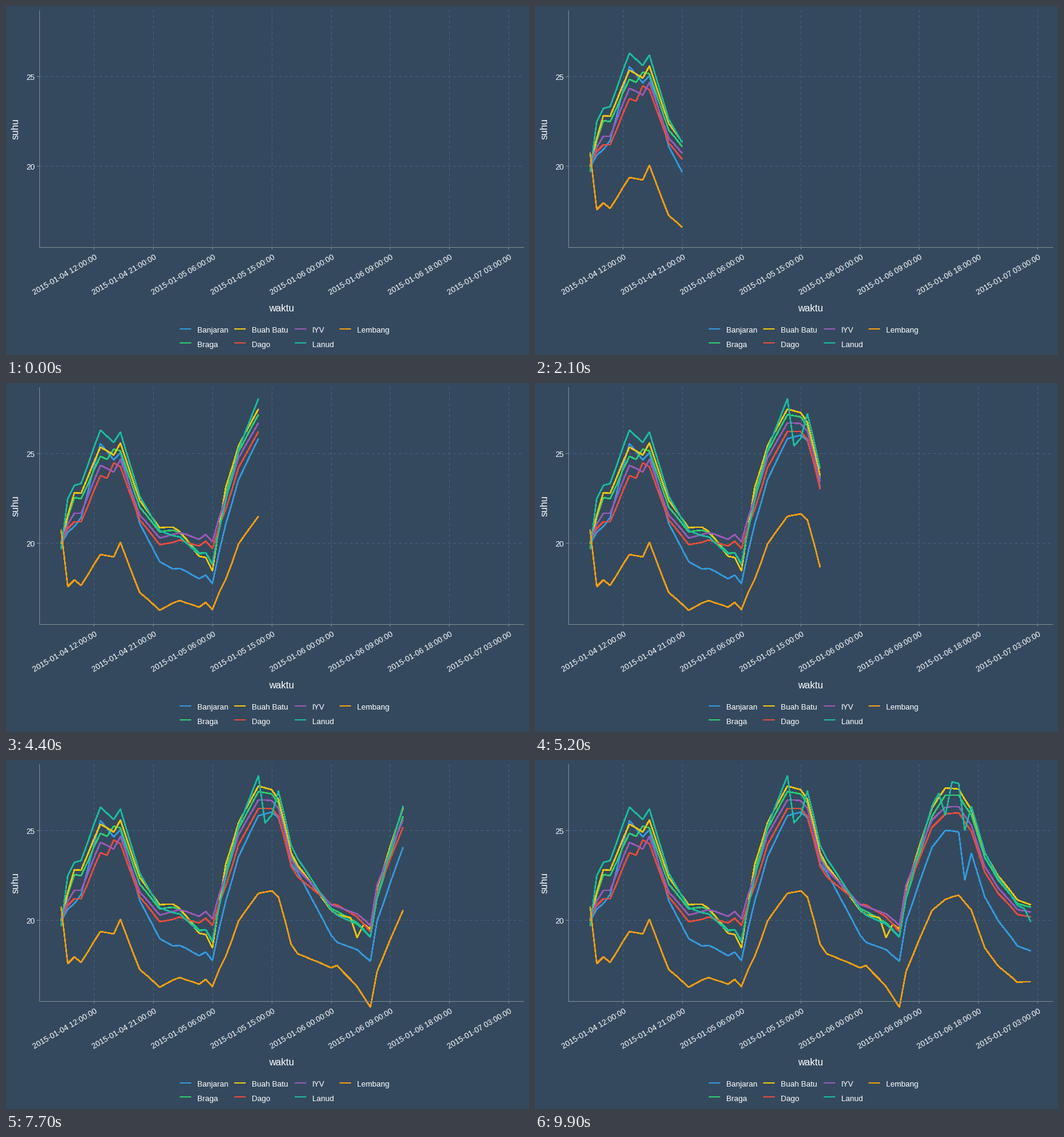
Recreate the animation shown at these times as a matplotlib script. Size 864 by 576 pixels, loop 10 s.

```python
import numpy as np
import matplotlib.pyplot as plt
from matplotlib.animation import FuncAnimation

W, H, DPI = 864, 576, 96
PX = 72 / DPI                      # one pixel in points
FRAMES, HOURS = 100, 67
BG, GRID, AXIS, INK = "#34495e", "#46627f", "#7f8c8d", "#ffffff"
LEFT, RIGHT, TOP, BOTTOM = 55, 856, 7, 398
X0, STEP = 91.6, 10.866            # first hour and hour spacing

plt.rcParams["font.family"] = "Liberation Sans"
fig = plt.figure(figsize=(W / DPI, H / DPI), dpi=DPI, facecolor=BG)
ax = fig.add_axes([0, 0, 1, 1])
ax.set(xlim=(0, W), ylim=(H, 0))
ax.axis("off")


def line(xs, ys, color, width=1, **kw):
    return ax.plot(xs, ys, color=color, lw=width * PX, antialiased=False,
                   snap=False, solid_capstyle="butt",
                   dash_capstyle="butt", **kw)[0]


def label(x, y, s, size=9.7, ha="left", angle=0):
    ax.text(x, y, s, color=INK, size=size, ha=ha, va="baseline",
            rotation=angle, rotation_mode="anchor")


# Grid, ticks and tick labels
for i in range(8):
    x = int(X0 + STEP * (5 + 9 * i)) + 0.5
    day, hour = divmod(12 + 9 * i, 24)
    line([x, x], [BOTTOM, TOP], GRID, dashes=(4, 4))
    line([x, x], [BOTTOM, BOTTOM + 4], AXIS)
    label(x + 5.6, 416.5, f"2015-01-{4 + day:02}  {hour:02}:00:00".replace("  ", " "),
          ha="right", angle=30)
for temp, y in ((25, 116.5), (20, 264.5)):
    line([LEFT, RIGHT], [y, y], GRID, dashes=(4, 4))
    line([LEFT - 4, LEFT], [y, y], AXIS)
    label(47.5, y + 6, str(temp), ha="right")
line([LEFT + 0.5] * 2, [TOP, BOTTOM + 1], AXIS, zorder=4)
line([LEFT, RIGHT], [BOTTOM + 0.5] * 2, AXIS, zorder=4)
label(455, 504, "waktu", 12, "center")
label(21, 203, "suhu", 12, "center", 90)

# The city's three-day rhythm: key hours and their heights on the stage
rhythm = {
    0: 262, 1: 233, 2: 215, 3: 215, 6: 136, 8: 147, 9: 126, 11: 190, 12: 218,
    15: 256, 18: 247, 21: 258, 22: 250, 23: 262, 24: 223, 27: 124, 30: 66,
    32: 67, 33: 80, 35: 163, 36: 181, 41: 239, 45: 254, 47: 273, 48: 206,
    52: 99, 54: 78, 56: 77, 58: 108, 60: 176, 62: 211, 65: 247, 67: 251}

# Each station drifts from the rhythm between these hours, with a few jolts
turns = [0, 2, 6, 12, 17, 23, 25, 30, 36, 42, 48, 54, 67]
stations = [
    ("Banjaran", "#3498db",
     [4, 22, -36, 14, 57, 69, 43, 26, 5, 59, 60, 38, 64], {57: 62}),
    ("Braga", "#2ecc71",
     [4, -26, -15, -13, -7, 38, -7, -14, -3, 8, 22, -20, -8], {8: -23}),
    ("Buah Batu", "#f1c40f",
     [4, -34, -30, -24, -12, 48, -18, -23, -7, 13, 5, -32, -12], {45: 30}),
    ("Dago", "#e74c3c",
     [0, 14, 17, 8, 13, 11, 18, 14, 12, -3, 14, 11, 8], {8: -29}),
    ("IYV", "#9b59b6", [0] * len(turns), {}),
    ("Lanud", "#1abc9c",
     [12, -46, -58, -31, 2, 36, 4, -40, -18, 14, 20, -44, 0],
     {1: -25, 31: 74, 32: 57, 54: 57, 57: 58, 67: 16}),
    ("Lembang", "#f39c12",
     [-20, 110, 147, 128, 113, 112, 134, 154, 139, 97, 143, 152, 115],
     {1: 58}),
]

hours = np.arange(HOURS + 1)
base = np.interp(hours, list(rhythm), list(rhythm.values()))


def heights(drift, jolts):
    ys = base + np.interp(hours, turns, drift)
    for hour, jolt in jolts.items():
        ys[hour] += jolt
    return ys


curves = []
for i, (name, color, drift, jolts) in enumerate(stations):
    col, row = divmod(i, 2)
    x, y = (287, 377, 477, 551)[col], (533, 556)[row]
    line([x, x + 19], [y, y], color, 2)
    label(x + 29, 539 + 24 * row, name)
    curves.append((line([], [], color, 1.5, zorder=3), heights(drift, jolts)))

# Each reading lands on a whole frame; the line grows evenly in between
arrival = np.round(hours * (FRAMES - 1) / HOURS)


def draw(frame):
    head = np.interp(frame, arrival, hours)
    shown = np.append(hours[hours < head], head) if frame else hours[:0]
    xs = np.floor(X0 + STEP * shown)
    for curve, ys in curves:
        curve.set_data(xs, np.floor(np.interp(shown, hours, ys)))
    return [curve for curve, _ in curves]


anim = FuncAnimation(fig, draw, frames=FRAMES, interval=100,
                     repeat=True, repeat_delay=0)
plt.show()
```
